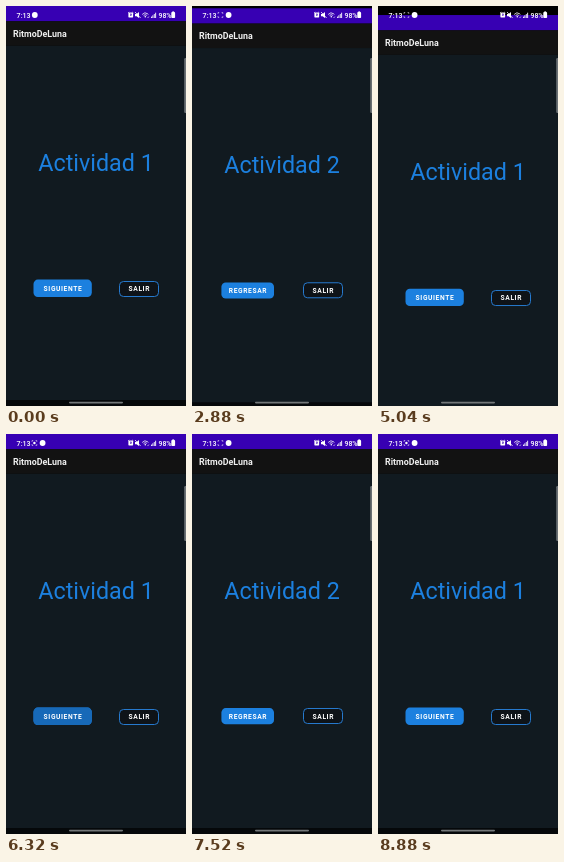
Animation of 180x400 px, one loop 9120 ms. Source, as an HTML page with a canvas:

```html
<!DOCTYPE html>
<html lang="es">
<head>
<meta charset="utf-8">
<title>Actividades</title>
<style>
html, body { margin: 0; width: 100%; height: 100%; overflow: hidden; background: #000; }
canvas { display: block; width: 180px; height: 400px; }
</style>
</head>
<body>
<canvas id="stage"></canvas>
<script>
const W = 180, H = 400, LOOP = 9120;
const PURPLE = '#3700b3', BLUE = '#1c80df', BG = '#111a20', BAR = '#121212';
const canvas = document.getElementById('stage');
const ctx = canvas.getContext('2d');
const dpr = window.devicePixelRatio || 1;
canvas.width = W * dpr;
canvas.height = H * dpr;

const SCREENS = [
  { title: 'Actividad 1', y: 164.6, main: 'SIGUIENTE', box: [27.5, 273.6, 58.3, 17.4], exit: [113.5, 275.5, 39, 15], labelY: 285.2 },
  { title: 'Actividad 2', y: 165, main: 'REGRESAR', box: [29.4, 274.1, 52.6, 16.2], exit: [111.5, 274.5, 39, 15], labelY: 284.8 }
];
// Each tap: ripple first, then the next screen slides up.
const TAPS = [2320, 4560, 6000, 7600];
const SWITCH = 430, SLIDE = 240, RISE = 16.4;
// Times at which the centre of the recording icon toggles.
const BLINKS = [240, 2320, 5520, 6960, 8480];

const clamp = v => Math.max(0, Math.min(1, v));

function rect(x, y, w, h, color) {
  ctx.fillStyle = color;
  ctx.fillRect(x, y, w, h);
}

function roundPath(x, y, w, h, r) {
  ctx.beginPath();
  ctx.roundRect(x, y, w, h, r);
}

function roundBox(x, y, w, h, r, color) {
  roundPath(x, y, w, h, r);
  ctx.fillStyle = color;
  ctx.fill();
}

function disc(x, y, r, color) {
  ctx.fillStyle = color;
  ctx.beginPath();
  ctx.arc(x, y, r, 0, Math.PI * 2);
  ctx.fill();
}

function line(points, width = 0.9) {
  ctx.strokeStyle = '#fff';
  ctx.lineWidth = width;
  ctx.beginPath();
  points.forEach(([x, y], i) => i ? ctx.lineTo(x, y) : ctx.moveTo(x, y));
  ctx.stroke();
}

function label(str, x, y, size, weight, color, align = 'left', spacing = 0) {
  ctx.font = `${weight} ${size}px Roboto, sans-serif`;
  ctx.letterSpacing = spacing + 'px';
  ctx.textAlign = align;
  ctx.fillStyle = color;
  ctx.fillText(str, x + (align === 'center' ? spacing / 2 : 0), y);
  ctx.letterSpacing = '0px';
}

function drawButton([x, y, w, h], press) {
  ctx.save();
  roundBox(x, y, w, h, 4.4, BLUE);
  if (press > 0) {
    ctx.clip();
    disc(x + w / 2, y + h / 2, press * w * 0.6, '#1769b8');
  }
  ctx.restore();
}

function drawScreen(s, dy, press = 0) {
  ctx.save();
  ctx.translate(0, dy);
  rect(0, 0, W, 15.3, PURPLE);
  rect(0, 15.3, W, 24.5, BAR);
  rect(0, 39.8, W, H, BG);
  rect(0, 394, W, 6, '#05080a');
  label('RitmoDeLuna', 7, 31, 8.9, 700, '#f0f0f0');
  label(s.title, 90, s.y, 23.3, 400, '#1c80df', 'center');
  drawButton(s.box, press);
  const [bx, , bw] = s.box, [ex, ey, ew, eh] = s.exit;
  label(s.main, bx + bw / 2, s.labelY, 6.7, 700, '#fff', 'center', 0.6);
  roundBox(ex, ey, ew, eh, 4, '#0e1318');
  ctx.strokeStyle = '#2679cd';
  ctx.lineWidth = 1;
  ctx.stroke();
  label('SALIR', ex + ew / 2, s.labelY + 0.2, 6.7, 700, '#fff', 'center', 0.6);
  ctx.restore();
}

function drawRecord(t) {
  for (const sx of [-1, 1]) for (const sy of [-1, 1]) {
    const x = 28.4 + sx * 2.4, y = 9 + sy * 2.4;
    line([[x - sx * 1.2, y], [x, y], [x, y - sy * 1.2]], 0.6);
  }
  if (BLINKS.filter(b => b <= t).length % 2) disc(28.4, 9, 1.2, '#fff');
}

function drawStatus(t) {
  label('7:13', 10.6, 11.6, 7.1, 500, '#fff');
  const shift = clamp((t - 80) / 160);
  if (shift > 0) {
    ctx.globalAlpha = shift;
    drawRecord(t);
    ctx.globalAlpha = 1;
  }
  disc(28.8 + 7.8 * shift, 9, 2.9, '#fff');

  // alarm
  roundBox(122.4, 6.4, 4.7, 5.2, 1.2, '#fff');
  line([[122, 7], [123.2, 6]], 0.7);
  line([[127.4, 7], [126.2, 6]], 0.7);
  ctx.strokeStyle = PURPLE;
  ctx.lineWidth = 0.6;
  ctx.strokeRect(124.5, 8, 1, 1.4);
  // muted speaker
  ctx.fillStyle = '#fff';
  ctx.beginPath();
  ctx.moveTo(129, 8); ctx.lineTo(130.6, 8); ctx.lineTo(133, 6);
  ctx.lineTo(133, 12); ctx.lineTo(130.6, 10.2); ctx.lineTo(129, 10.2);
  ctx.fill();
  line([[129, 6], [134.6, 12]], 0.8);
  // wifi
  for (const r of [2.2, 4]) {
    ctx.beginPath();
    ctx.arc(139.3, 11, r, -Math.PI * 0.78, -Math.PI * 0.22);
    ctx.stroke();
  }
  disc(139.3, 10.8, 0.8, '#fff');
  line([[141.6, 12], [142.8, 10.6]], 0.7);
  // signal bars
  for (let i = 0; i < 4; i++) rect(145 + i * 1.4, 10.6 - i * 1.3, 0.9, 1.4 + i * 1.3, '#fff');
  label('98%', 152.4, 11.6, 7, 500, '#fff');
  // battery
  rect(166.3, 5.4, 1.8, 1, '#fff');
  roundBox(165.3, 6.1, 3.8, 5.9, 0.8, '#fff');
}

function draw(t) {
  ctx.setTransform(dpr, 0, 0, dpr, 0, 0);
  rect(0, 0, W, H, '#000');

  const count = TAPS.filter(s => s <= t).length;
  const age = count ? t - TAPS[count - 1] : LOOP;
  const next = SCREENS[count % 2];
  const prev = SCREENS[(count + 1) % 2];

  if (count && age < SWITCH) {
    drawScreen(prev, 0, clamp((age + 40) / 280));
  } else {
    const left = Math.pow(1 - clamp((age - SWITCH) / SLIDE), 2.5);
    drawScreen(next, RISE * left);
  }

  drawStatus(t);
  roundBox(63, 395.8, 54, 1.6, 0.8, '#74787a');
  roundBox(178.2, 52, 4, 55, 1.2, '#6a7074');
}

function tick() {
  draw(performance.now() % LOOP);
  requestAnimationFrame(tick);
}
tick();
</script>
</body>
</html>
```
